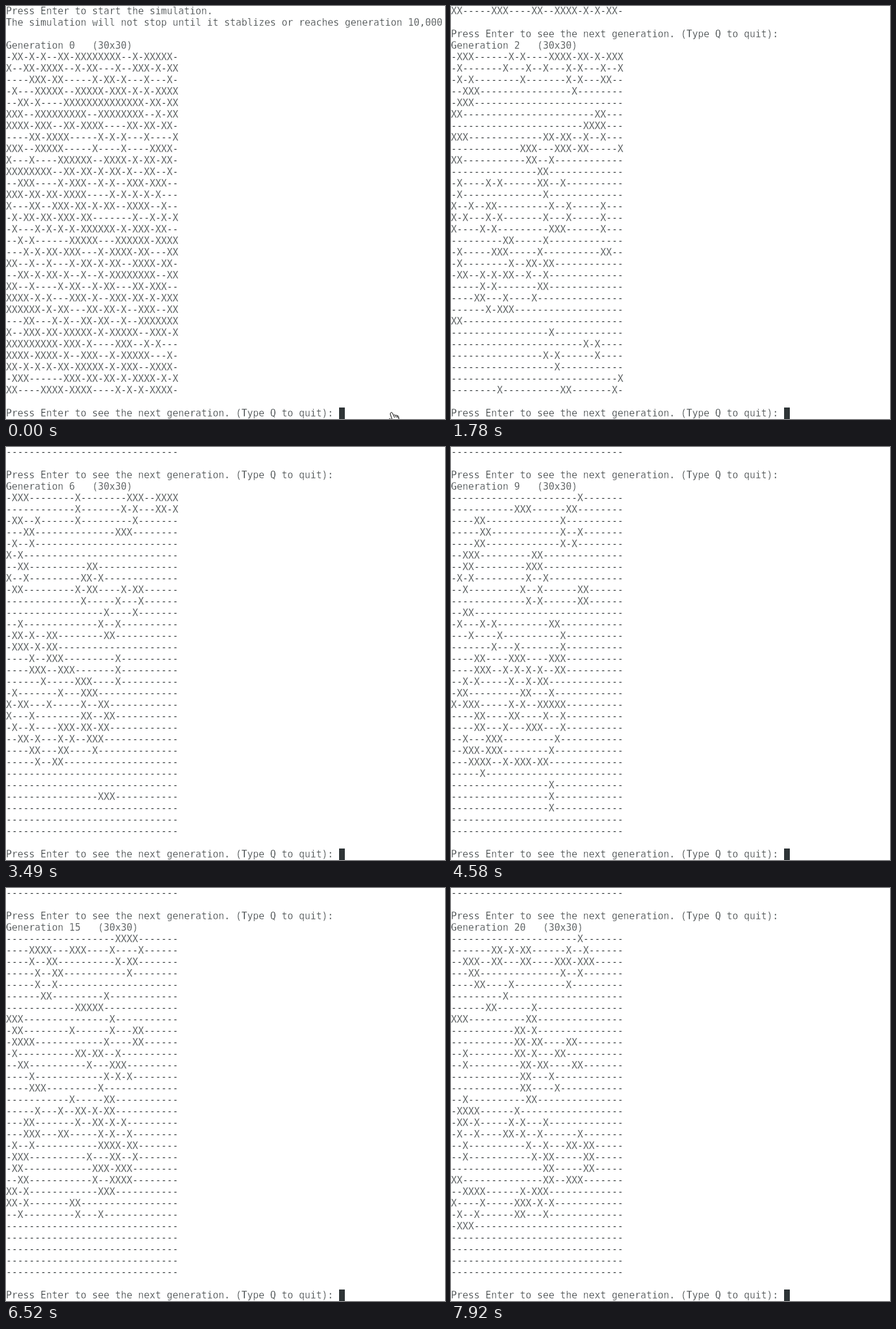
Animation, 688 px wide and 647 px high, one loop 8000 ms. Source, as an HTML page:

```html
<!DOCTYPE html>
<html lang="en">
<head>
<meta charset="utf-8">
<title>Life in a terminal</title>
<style>
  html, body { margin: 0; width: 100%; height: 100%; overflow: hidden; background: #fff; }
  #stage { position: relative; width: 688px; height: 647px; overflow: hidden; background: #fff; }
  #screen {
    position: absolute; left: 0; top: -1px; margin: 0;
    font: 15px/18px "DejaVu Sans Mono", monospace;
    letter-spacing: calc(9px - 1ch);
    font-variant-ligatures: none;
    color: #2e3436;
    -webkit-text-stroke: .35px #fff; /* thins the strokes to about one pixel */
  }
  #cursor { position: absolute; left: 522px; top: 629px; width: 9px; height: 18px; background: #2e3436; }
  #hand { position: absolute; left: 0; top: 0; }
</style>
</head>
<body>
<div id="stage">
  <pre id="screen"></pre>
  <div id="cursor"></div>
  <svg id="hand" width="18" height="23" viewBox="0 0 18 23">
    <path d="M3.5 1.6C4.4 .2 6 .4 6.6 1.8L8.5 5.5C9.4 4.3 10.9 4.5 11.4 5.4C12.3 4.6 13.5 5 14 6C15 5.6 16 6.2 16.2 7.2L17 12V16L15.5 21.5H8L6 17L1 12.5C.5 11 2 10 3.5 11L6.5 12.5L3.2 3.5Z"
      fill="#fff" stroke="#000" stroke-linejoin="round"/>
    <path d="M8.5 5.5L10 9M11.4 5.4L12.6 8.6M14 6L15 9" fill="none" stroke="#000"/>
  </svg>
</div>
<script>
const SIZE = 30, LAST = SIZE - 1, LOOP = 8000;
const PROMPT = "Press Enter to see the next generation. (Type Q to quit): ";
const INTRO = [
  "Press Enter to start the simulation.",
  "The simulation will not stop until it stablizes or reaches generation 10,000",
  ""
];
// Start time of each generation
const STARTS = [0, 1230, 1780, 2250, 2660, 3110, 3490, 3870, 4200, 4580, 4900,
  5280, 5590, 5970, 6200, 6520, 6820, 7140, 7370, 7690, 7920];
const SEED = `
-XX-X-X--XX-XXXXXXXX--X-XXXXX-
X--XX-XXXX--X-XX---X--XXX-X-XX
----XXX-XX-----X-XX-X---X---X-
-X---XXXXX--XXXXX-XXX-X-X-XXXX
--XX-X----XXXXXXXXXXXXXX-XX-XX
XXX--XXXXXXXXX--XXXXXXXX--X-XX
XXXX-XXX--XX-XXXX----XX-XX-XX-
----XX-XXXX-----X-X-X---X----X
XXX--XXXXX-----X----X----XXXX-
X---X----XXXXXX--XXXX-X-XX-XX-
XXXXXXXX--XX-XX-X-XX-X--XX--X-
--XXX----X-XXX--X-X--XXX-XXX--
XXX-XX-XX-XXXX----X-X-X-X-X---
X---XX--XXX-XX-X-XX--XXXX--X--
-X-XX-XX-XXX-XX-------X--X-X-X
-X---X-X-X-X-XXXXXX-X-XXX-XX--
--X-X------XXXXX---XXXXXX-XXXX
---X-X-XX-XXX---X-XXXX-XX---XX
XX--X--X---X-XX-X-XX--XXXX-XX-
--XX-X-XX-X--X--X-XXXXXXXX--XX
XX--X----X-XX--X-XX---XX-XXX--
XXXX-X-X---XXX-X--XXX-XX-X-XXX
XXXXXX-X-XX---XX-XX-X--XXX--XX
---XX---X-X--XX-XX--X--XXXXXXX
X--XXX-XX-XXXXX-X-XXXXX--XXX-X
XXXXXXXXX-XXX-X----XXX--X-X---
XXXX-XXXX-X--XXX--X-XXXXX---X-
XX-X-X-X-XX-XXXXX-X-XXX--XXXX-
-XXX------XXX-XX-XX-X-XXXX-X-X
XX----XXXX-XXXX----X-X-X-XXXX-`.trim().split("\n");

const isEdge = n => n === 0 || n === LAST;

function nextCell(grid, r, c) {
  // The inner cells beside the bottom and right edges are never revived
  if (!isEdge(r) && !isEdge(c) && (r === LAST - 1 || c === LAST - 1)) return "-";
  const alive = grid[r][c] === "X";
  let count = alive ? -1 : 0;
  for (let y = r - 1; y <= r + 1; y++)
    for (let x = c - 1; x <= c + 1; x++)
      if (grid[y]?.[x] === "X") count++;
  return count === 3 || (alive && count === 2) ? "X" : "-";
}

const evolve = grid => grid.map((row, r) =>
  [...row].map((_, c) => nextCell(grid, r, c)).join(""));

function buildScreens() {
  let grid = SEED, head = INTRO;
  return STARTS.map((_, gen) => {
    const lines = [...head, `Generation ${gen}   (30x30)`, ...grid, "", PROMPT];
    head = [grid[LAST], "", PROMPT];
    grid = evolve(grid);
    return lines.join("\n");
  });
}

const screens = buildScreens();
const screenEl = document.getElementById("screen");
const hand = document.getElementById("hand");
let shown = -1;

function draw(t) {
  const gen = STARTS.findLastIndex(start => t >= start);
  if (gen !== shown) {
    screenEl.textContent = screens[gen];
    shown = gen;
  }
  hand.style.display = t < 150 ? "block" : "none";
  hand.style.transform = t < 70 ? "translate(599px, 636px)" : "translate(668px, 579px)";
}

const begin = performance.now();
function tick() {
  draw((performance.now() - begin) % LOOP);
  requestAnimationFrame(tick);
}
tick();
</script>
</body>
</html>
```
